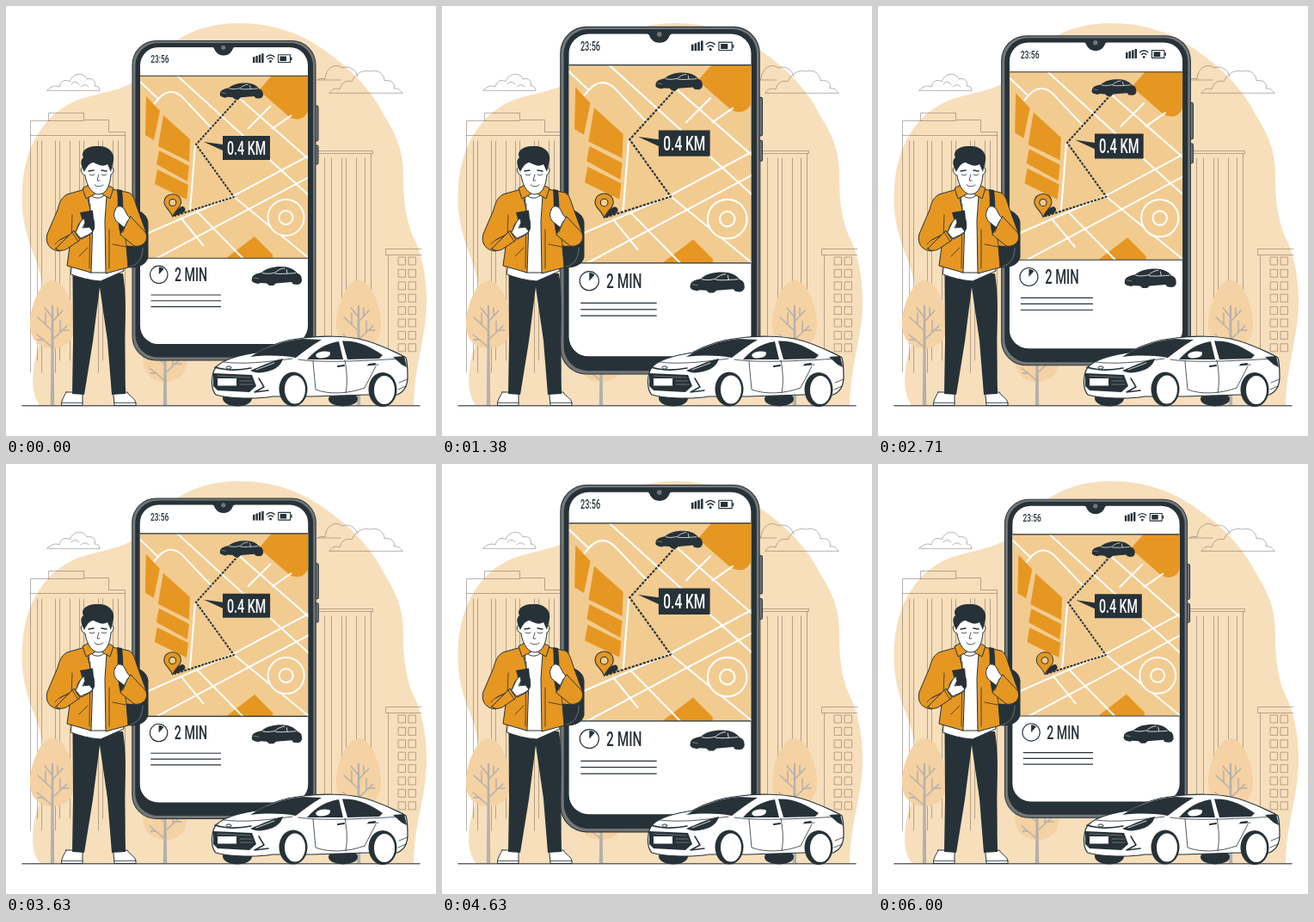
An HTML page with a canvas that plays this animation: 500 by 500 pixels, repeating every 6.04 s.

```html
<!DOCTYPE html>
<html lang="en">
<head>
<meta charset="utf-8">
<title>Car pickup</title>
<style>
html, body { margin: 0; width: 100%; height: 100%; overflow: hidden; background: #fff; }
canvas { display: block; width: 100%; height: 100%; }
</style>
</head>
<body>
<canvas id="stage"></canvas>
<script>
const SIZE = 500, LOOP = 6040, CYCLE = 6000, LEAD = 45;
const DARK = '#263238', ORANGE = '#e69722', MAP = '#f2cb90', BLOB = '#f7dfbc',
      LEAF = '#f5d2a3', TRUNK = '#b3b0ad', STEEL = '#737678', WHITE = '#fff',
      FAINT = 'rgba(92,74,66,.42)';

const canvas = document.getElementById('stage');
const ctx = canvas.getContext('2d');
const ratio = Math.max(1, window.devicePixelRatio || 1);
canvas.width = canvas.height = SIZE * ratio;

const paths = new Map();
function path(d) {
  if (!paths.has(d)) paths.set(d, new Path2D(d));
  return paths.get(d);
}
function fill(d, color) {
  ctx.fillStyle = color;
  ctx.fill(path(d));
}
function line(d, color = DARK, width = 1) {
  ctx.strokeStyle = color;
  ctx.lineWidth = width;
  ctx.stroke(path(d));
}
function shape(d, color, width = 1) {
  fill(d, color);
  line(d, DARK, width);
}
function oval(x, y, rx, ry, color, edge, width = 1) {
  ctx.beginPath();
  ctx.ellipse(x, y, rx, ry, 0, 0, Math.PI * 2);
  if (color) { ctx.fillStyle = color; ctx.fill(); }
  if (edge) { ctx.strokeStyle = edge; ctx.lineWidth = width; ctx.stroke(); }
}
function slab(x, y, w, h, r, color, edge) {
  ctx.beginPath();
  ctx.roundRect(x, y, w, h, r);
  ctx.fillStyle = color;
  ctx.fill();
  if (edge) { ctx.strokeStyle = edge; ctx.lineWidth = 1; ctx.stroke(); }
}
function at(x, y, scale, draw) {
  ctx.save();
  ctx.translate(x, y);
  ctx.scale(scale, scale);
  draw();
  ctx.restore();
}
// All labels share one condensed style.
function label(text, x, y, size, color) {
  ctx.save();
  ctx.translate(x, y);
  ctx.scale(.635, 1);
  ctx.font = `500 ${size}px Roboto, "Liberation Sans", sans-serif`;
  ctx.fillStyle = color;
  ctx.fillText(text, 0, 0);
  ctx.restore();
}

function tree(x, y, stem) {
  at(x, y, 1, () => {
    fill('M0 0C15 0 27 33 26 53C25 71 14 79 0 79C-14 79 -25 71 -26 53C-27 33 -15 0 0 0Z', LEAF);
    fill(`M-1 29H1L2.2 ${stem}H-2.2Z`, TRUNK);
    line('M0 69L17 53M9 60V47M0 59L-17 43M-8 51V38M0 48L12 35M6 41V32M0 78L-18 63M-10 69L-17 69M0 43L-9 32M11 58L19 58', TRUNK, 1.5);
  });
}

function scenery() {
  fill('M40 465C27 450 30 420 38 396C49 357 46 325 33 291C21 262 17 238 19 211C22 163 44 125 84 109C118 98 144 98 163 76C188 39 224 20 270 20C313 20 345 33 371 52C404 75 427 101 440 128C456 153 462 172 462 196C462 220 463 241 472 265C484 288 489 314 489 344C489 386 475 414 474 465Z', BLOB);

  fill('M48 98C53 93 58 92 62 94C64 86 70 85 74 88C78 77 91 77 94 85C101 83 105 88 103 93C107 93 109 95 109 98Z', WHITE);
  line('M48 98C53 93 58 92 62 94C64 86 70 85 74 88C78 77 91 77 94 85C101 83 105 88 103 93C107 93 109 95 109 98ZM76 91C79 87 83 88 85 91M87 94C90 91 94 91 96 94', FAINT);
  line('M362 86C365 84 369 84 371 85C372 71 384 66 391 72C398 69 407 73 409 82M362 86H389M376 101C379 96 384 95 388 97C390 88 397 86 402 88C407 77 416 74 424 76C433 73 440 80 440 87C449 85 453 91 451 96C456 95 459 98 461 101Z', FAINT);

  line('M28.5 426V133.5H49.5V124.5H90.5V132.5H119.5V146.5H138.5V426M28.5 150.5H138.5M49.5 133.5H90.5', FAINT);
  for (const x of [36, 41, 57, 62, 74, 85, 90, 107, 112, 124, 130]) line(`M${x}.5 157V${x % 2 ? 426 : 412}`, FAINT);

  line('M362 168.5H426.5V171.5H362M424.5 171.5V395', FAINT);
  for (const x of [370, 378, 390, 395, 407, 417]) line(`M${x}.5 177V${x % 2 ? 384 : 394}`, FAINT);
  line('M483 282.5H441.5V289.5H444.5V404M445 289.5H483', FAINT);
  for (let row = 0; row < 8; row++)
    for (const x of [456.5, 468.5]) line(`M${x} ${292 + row * 14.4}h8v9h-8Z`, FAINT);

  tree(54, 319, 145);
  tree(410, 319, 145);
  tree(185, 358, 106);
  line('M19 464.8H481', '#62666a', 1.6);
}

function miniCar(x, y, width) {
  at(x, y, width / 58, () => {
    fill('M0 14C0 10 5 8 11 7C17 2 24 0 34 0C43 0 49 3 53 8C57 9 58 12 58 17L56 20L53 21L48 20.5L46 18L28 19.5L25 22L20 22L17 19.5L10 19L7 20L3 19C0 18 -1 16 0 14Z', DARK);
    line('M12 7.5C18 9 23 8 27 7C30 4 34 2 38 2M27 8C33 9 44 8 51 7.5M40 3L41 8', WHITE, .8);
    line('M2 13L8 14', '#89908f', .8);
  });
}

function map() {
  ctx.save();
  ctx.beginPath();
  ctx.rect(156, 81, 195, 212);
  ctx.clip();
  fill('M156 81H351V293H156Z', MAP);
  fill('M163 105L179 122L172 156L162 150Z', ORANGE);
  fill('M183 127L214 155L213 181L177 163Z', ORANGE);
  fill('M178 168L213 186L211 204L175 184Z', ORANGE);
  fill('M176 190L212 208L210 225L173 207Z', ORANGE);
  fill('M309 81H352V120C348 133 335 135 326 126L294 98Z', ORANGE);
  fill('M255 294L289 268L310 289V294Z', ORANGE);
  line('M199 81L352 220M156 268L264 221L352 174M174 294L352 199M220 162L214 238M264 221L352 293M221 238L276 294M172 114L180 105Q192 95 204 105L240 143M271 107L352 178M281 143L308 116M309 143L332 127M156 88L178 109M203 246L230 279', WHITE, 2);
  oval(325.5, 246, 21, 21, MAP, WHITE, 2);
  oval(325.5, 246, 8, 8, null, WHITE, 2);
  ctx.restore();

  ctx.setLineDash([2.8, 1.4]);
  line('M270 107L221 161L265 222L196 244', DARK, 2);
  ctx.setLineDash([]);
  miniCar(249, 89.5, 50);

  fill('M194 245C197 239 201 233 206 233C210 235 209 240 204 241Z', DARK);
  shape('M193.8 245C191 237 184 234 184 228.5C184 215.5 203.5 215.5 203.5 228.5C203.5 234 196.5 237 193.8 245Z', ORANGE);
  oval(193.8, 228.5, 4, 4, MAP, DARK);

  fill('M252 151H307V179H252V168L230 158L252 161Z', DARK);
  label('0.4 KM', 257, 172.8, 22.4, WHITE);
}

function phone() {
  slab(359, 116, 4, 41, 1.5, STEEL, DARK);
  slab(359, 162, 4, 22, 1.5, STEEL, DARK);
  slab(147, 40.5, 213, 371.5, 28, STEEL, DARK);
  slab(150.5, 43, 206.5, 365.5, 26, DARK);
  slab(156, 48, 195, 345, 21, WHITE);
  fill('M238 47C243 48 242 51 244 53C248 59 258 59 262 53C264 51 263 48 268 47Z', DARK);
  oval(252.8, 48.3, 2.6, 2.6, '#737678');

  label('23:56', 168.3, 66.2, 13.2, DARK);
  for (let i = 0; i < 4; i++) {
    const top = 59.2 - i * 1.3;
    fill(`M${287 + i * 3.4} ${top}h2.4V66h-2.4Z`, DARK);
  }
  line('M302.5 59.5Q307.5 54.5 312.5 59.5M304.3 62Q307.5 58.8 310.7 62', DARK, 1.4);
  oval(307.5, 64.5, 1.4, 1.4, DARK);
  line('M316.5 56.8H330.5V65.5H316.5Z', DARK, 1.1);
  fill('M318.5 58.5H326V64H318.5ZM331 59.5H332.5V63H331Z', DARK);

  map();
  line('M156 81.3H351M156 293.2H351', DARK, 1.1);

  oval(177.8, 312.3, 10.2, 10.2, WHITE, DARK, 1.1);
  fill('M177.8 312.3V303.5A8.8 8.8 0 0 1 183.6 305.7Z', DARK);
  label('2 MIN', 196, 320.2, 22.4, DARK);
  miniCar(286, 303, 58);
  line('M168.5 336H250M168.5 342.8H250M168.5 349.6H250', DARK, 1.1);
}

function man() {
  // backpack
  shape('M137 237C150 234 164 240 165 252L165 292C163 302 150 306 137 303Z', DARK);
  line('M145 303C156 300 159 290 159 281', '#7b8386', .8);

  // shoes and trousers
  shape('M70 449H89V464.5H64.5C64 458 68 454 70 449Z', WHITE);
  shape('M125 449H141C144 455 152 456 151 464.5H126.5Z', WHITE);
  line('M64.5 461.5H89M126 461.5H151', DARK, .8);
  fill('M77.5 311H136C140 336 139 360 138 389L139 451L123 452L118 389L109 327L101 390L91 452L77 451L78 390Z', DARK);

  // shirt
  shape('M77 302H136L137 308L110 320C97 319 86 316 75.5 312Z', WHITE);
  shape('M97 213H118L119 310H98Z', WHITE);

  // jacket
  shape('M92 213L71 219C64 223 62 229 60 237L48 265C45 276 51 284 62 285L74 280L71 302L99 310L101 250Z', ORANGE);
  shape('M118 212L143 217C149 220 150 228 153 236L164 266C165 275 158 280 151 280L140 279L142 304L116 311L115 250Z', ORANGE);
  line('M77 243L76 269M63 272L81 262M57 277C62 271 67 269 72 268M98 230L97 305M120 305L120 260M140 279L137 253M139 280L124 277M85 291L95 281M148 271C153 265 151 261 149 258', DARK, .8);
  fill('M129 213L135 214C137 231 136 244 138 263L133 266C128 247 131 231 129 213Z', DARK);

  // strap hand and sleeve
  shape('M127 237C129 231 135 232 138 237L141 243L146 249L138 258L128 250C125 245 125 241 127 237Z', WHITE);
  shape('M145 245L162 263C167 272 159 281 149 279L133 266Z', ORANGE);
  line('M141 250L136 263', DARK, .8);

  // hand with handset
  shape('M82 263C82 257 86 250 90 248L101 247C104 252 103 261 99 265L88 271Z', WHITE);
  fill('M86 240L101 237.5L103 259L98 264L92 262Z', DARK);
  shape('M81 263C84 258 86 249 91 247L92 252L89 258L97 257L101 262L96 266L87 270Z', WHITE);
  shape('M58 282L79 261L86 272L70 283C65 285 61 285 58 282Z', ORANGE);
  line('M77 263L84 274', DARK, .8);

  // head and collar
  shape('M97 208V217C101 226 114 225 118 215V202Z', WHITE);
  shape('M96 208L89 212L93 224L103 219Z', ORANGE);
  shape('M118 208L125 212L121 224L112 219Z', ORANGE);
  shape('M90 188C86 186 86 195 92 197C94 211 101 219 108 219C117 219 121 208 122 196C126 194 126 187 122 188L119 180H92Z', WHITE);
  fill('M91 193C88 187 85 180 90 176C86 168 96 162 107 163C119 162 127 171 125 180L122 193L118 184C112 188 106 184 102 182C97 182 94 187 91 193Z', DARK);
  line('M96 192L102 191M111 191L117 192', DARK, 1.4);
  line('M97 196Q100 198 103 196M111 196Q114 198 117 196M108 196L106 203L109 203M103 208Q108 212 113 208', DARK, .8);
}

function wheel(x, y) {
  oval(x, y, 16.5, 20, DARK);
  oval(x + 2, y + .5, 12, 16.5, WHITE);
}

function sedan() {
  oval(269, 456, 17, 9.5, DARK);
  oval(392, 457, 17, 8.5, DARK);
  shape('M240 431C241 422 245 417 256 412C267 407 279 405 291 403C307 394 326 388 346 386C369 383 395 384 410 387C430 391 445 399 460 406L465 409C467 416 467 424 467 431C467 443 462 449 455 452L420 452L356 454L310 454C294 457 259 457 244 452C239 447 239 437 240 431Z', WHITE, 1.2);

  // glass
  fill('M284 408C301 397 323 389 345 387L367 388C355 395 346 402 337 409C319 406 303 406 284 408Z', DARK);
  fill('M350 411C360 400 370 393 387 390L392 411Z', DARK);
  fill('M391 389.5C411 389 425 397 438 406L434 410L397 411Z', DARK);
  line('M389 389L395 412', WHITE, 1.2);
  shape('M360 405C363 401 371 400 377 402C379 407 373 410 366 410C362 410 359 408 360 405Z', WHITE);

  // doors and bonnet
  line('M340 411C365 415 411 413 460 410M357 413L360 446C376 452 398 451 417 444L430 419M394 412C397 428 397 439 395 450M253 414C277 417 303 414 333 410M420 418L433 417', DARK, .8);
  line('M386 419L393 418M422 417L429 416', DARK, 2);

  // front end
  line('M243 420C256 424 270 424 285 421', DARK, 1.6);
  oval(259, 420.5, 3, 1.6, WHITE, DARK);
  fill('M284 424C296 419 308 413 322 410C320 418 313 423 304 425C296 427 290 427 284 424Z', DARK);
  line('M291 423L312 415', WHITE, .8);
  fill('M241 427L286 429L291 442L283 449L246 447L241 442Z', DARK);
  line('M246 430L284 432M272 436H286M272 440H287', '#798083', .8);
  slab(245.5, 432.5, 23, 9.5, 1, WHITE, DARK);
  line('M294 433L300 443L289 449L305 447', DARK, 1.5);
  fill('M450 408L463 407L466 420L460 417Z', DARK);
  line('M457 438L467 434M456 446L465 442', DARK, .8);

  wheel(334, 445.5);
  wheel(438, 446);
}

// Two pulses: a quick rise with a slow fall, then a quick rise and fall.
function pulse(time) {
  const t = Math.min(time + LEAD, CYCLE) / CYCLE;
  if (t < .2) return t / .2;
  if (t < .6) return (.6 - t) / .4;
  if (t < .8) return (t - .6) / .2;
  return (1 - t) / .2;
}

function frame(now) {
  const scale = (1 + .1 * pulse(now % LOOP)) / 1.0037;
  ctx.setTransform(ratio, 0, 0, ratio, 0, 0);
  ctx.lineJoin = ctx.lineCap = 'round';
  ctx.fillStyle = WHITE;
  ctx.fillRect(0, 0, SIZE, SIZE);
  scenery();
  ctx.lineCap = 'butt';
  at(253.5, 227, scale, () => {
    ctx.translate(-253.5, -227);
    phone();
  });
  ctx.lineCap = 'round';
  man();
  sedan();
  requestAnimationFrame(frame);
}
requestAnimationFrame(frame);
</script>
</body>
</html>
```
